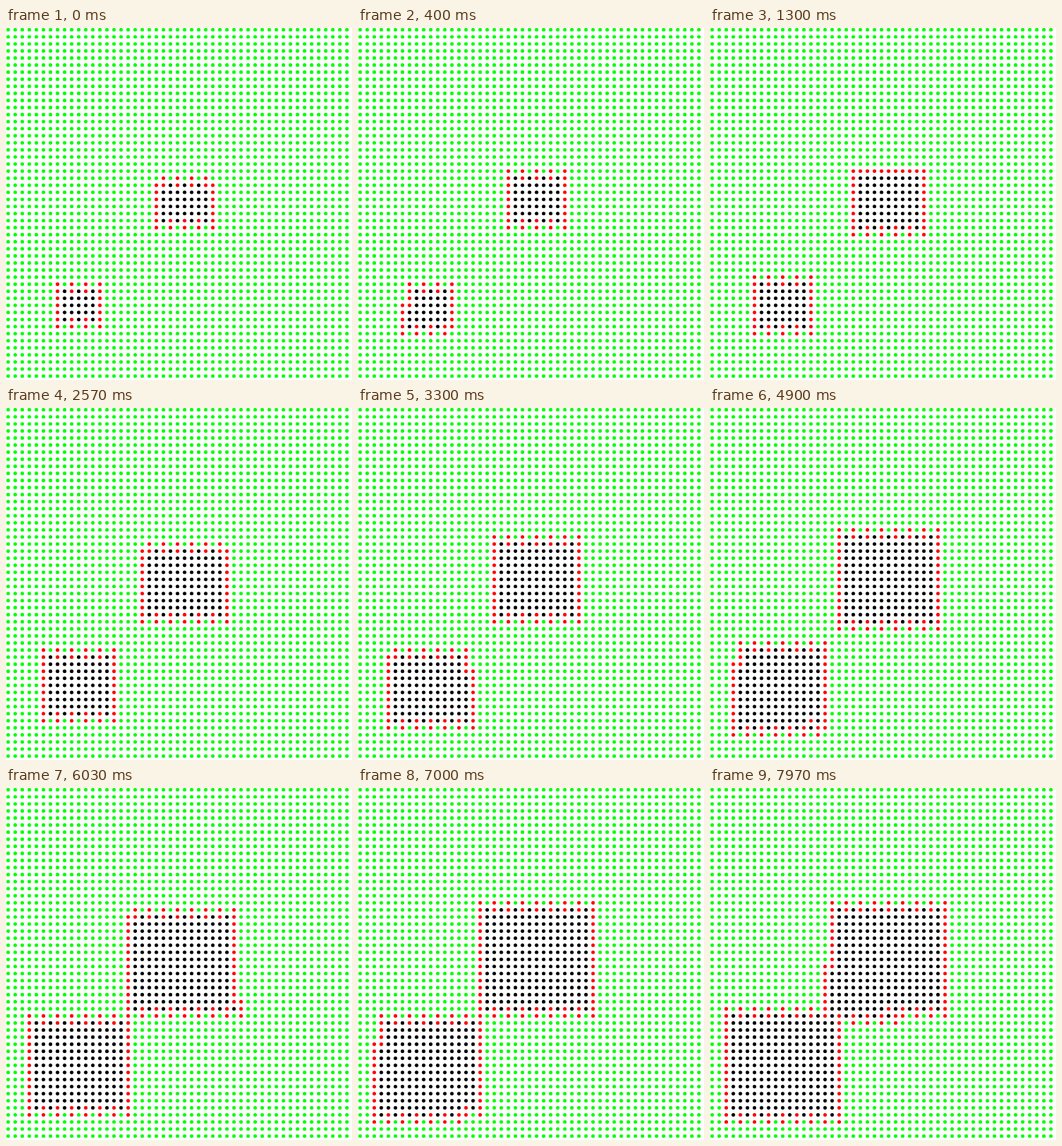
Write an HTML page with a canvas that moves like this. It is 502 px wide and 510 px high and loops after 8 s.

```html
<!DOCTYPE html>
<html lang="en">
<head>
<meta charset="utf-8">
<title>Forest fire</title>
<style>
  html, body { margin: 0; width: 100%; height: 100%; overflow: hidden; background: #fff; }
  canvas { display: block; }
</style>
</head>
<body>
<canvas id="stage" width="502" height="510"></canvas>
<script>
const ctx = document.getElementById('stage').getContext('2d');
const COLS = 49, ROWS = 50, PITCH = 10.24, RADIUS = 2.6, LOOP = 8000;
const SEEDS = [[25, 24], [10, 39]];
// Fire spreads sideways and diagonally, but never straight up or down.
const SPREAD = [[-1, 1], [1, 1], [-1, 0], [1, 0], [-1, -1], [1, -1]];

// Breadth-first spread: each tree notes after how many burnt trees it ignites.
function spreadFire() {
  const queue = SEEDS.map(([col, row]) => ({ col, row, ignitedAt: 0 }));
  const seen = new Set(SEEDS.map(String));
  for (let i = 0; i < queue.length; i++) {
    for (const [dx, dy] of SPREAD) {
      const col = queue[i].col + dx, row = queue[i].row + dy;
      const key = `${col},${row}`;
      if (col < 0 || row < 0 || col >= COLS || row >= ROWS || seen.has(key)) continue;
      seen.add(key);
      queue.push({ col, row, ignitedAt: i + 1 });
    }
  }
  return queue;
}

const trees = spreadFire();

// The fire is a little slower at first, then burns at a steady rate.
const burntCount = s => Math.floor(Math.max(56 + 39 * s, 47.85 + 48.6 * s));

function drawTrees(color, list) {
  ctx.fillStyle = color;
  ctx.beginPath();
  for (const { col, row } of list) {
    const x = 3.1 + col * PITCH, y = 2.5 + row * PITCH;
    ctx.moveTo(x + RADIUS, y);
    ctx.arc(x, y, RADIUS, 0, Math.PI * 2);
  }
  ctx.fill();
}

function draw(ms) {
  const burnt = burntCount(ms / 1000);
  ctx.fillStyle = '#fff';
  ctx.fillRect(0, 0, 502, 510);
  drawTrees('#0f0', trees.filter(tree => tree.ignitedAt > burnt));
  drawTrees('#f00', trees.filter((tree, i) => i >= burnt && tree.ignitedAt <= burnt));
  drawTrees('#000', trees.slice(0, burnt));
}

const start = performance.now();
function tick() {
  draw((performance.now() - start) % LOOP);
  requestAnimationFrame(tick);
}
tick();
</script>
</body>
</html>
```
